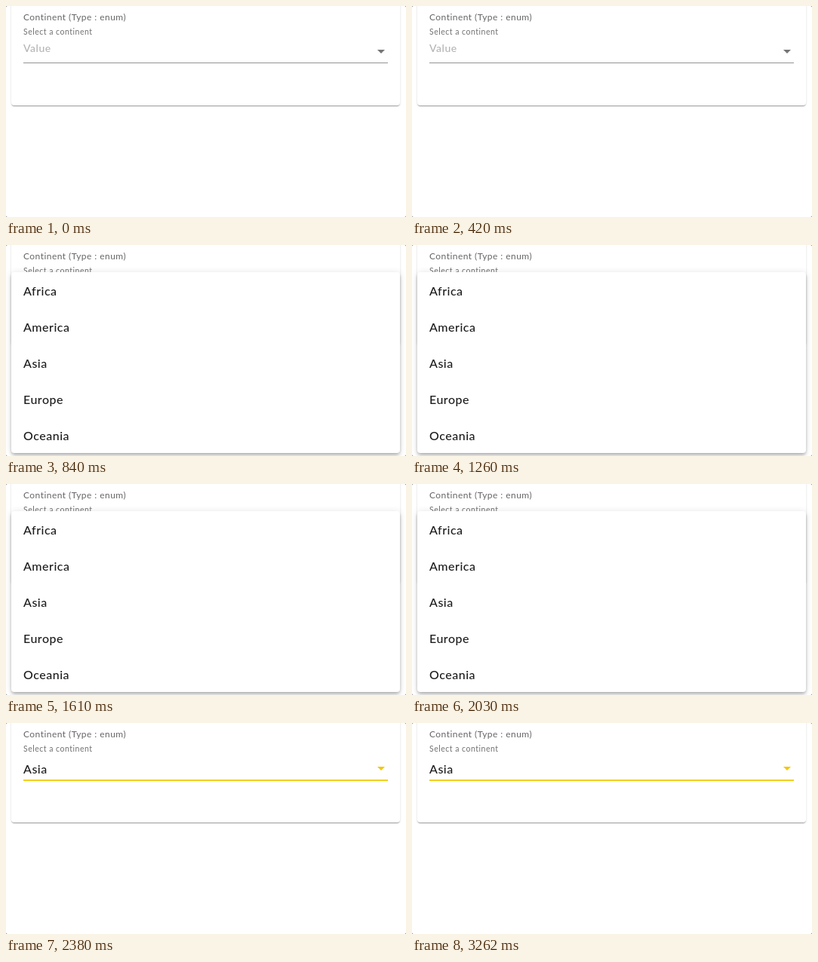
An HTML page for the animation above (3.85 s loop, 530x280 px).

```html
<!DOCTYPE html>
<html lang="en">
<head>
<meta charset="utf-8">
<title>Continent select</title>
<style>
  html, body { margin: 0; width: 100%; height: 100%; overflow: hidden; background: #777; }
  .stage { position: relative; width: 530px; height: 280px; overflow: hidden; border-radius: 2px; background: #fff; }
  .card, .menu { position: absolute; left: 7px; width: 515px; background: #fff; border-radius: 4px; }
  .card {
    top: -20px; height: 152px;
    box-shadow: 0 2px 1px -1px rgba(0,0,0,.2), 0 1px 1px rgba(0,0,0,.14), 0 1px 3px rgba(0,0,0,.12);
  }
  .menu {
    top: 36px; height: 240px;
    box-shadow: 0 2px 4px -1px rgba(0,0,0,.2), 0 4px 5px rgba(0,0,0,.14), 0 1px 10px rgba(0,0,0,.12);
  }
  svg { position: absolute; left: 0; top: 0; display: block; }
  text { font-family: Lato, "Open Sans", sans-serif; }
  .title { font-size: 12px; letter-spacing: .45px; fill: #666; }
  .hint { font-size: 10.5px; letter-spacing: .5px; fill: #707070; }
  .value { font-size: 14px; letter-spacing: .55px; fill: #b4b4b4; font-weight: 500; }
  .option { font-size: 16px; letter-spacing: .5px; fill: #1c1c1c; font-weight: 500; }

  .idle, .focus, .empty, .chosen, .menu, .pick { animation: 3850ms step-end infinite; }
  .idle { animation-name: idle; }
  .focus { animation-name: focus; }
  .empty { animation-name: empty; }
  .chosen { animation-name: chosen; }
  .menu { animation-name: menu; }
  .pick { animation-name: pick; }
  @keyframes idle { 0% { opacity: 1; } 18.1818%, 100% { opacity: 0; } }
  @keyframes focus { 0% { opacity: 0; } 18.1818%, 100% { opacity: 1; } }
  @keyframes empty { 0% { opacity: 1; } 61.8182%, 100% { opacity: 0; } }
  @keyframes chosen { 0% { opacity: 0; } 61.8182%, 100% { opacity: 1; } }
  @keyframes menu { 0% { opacity: 0; } 21.8182% { opacity: 1; } 61.8182%, 100% { opacity: 0; } }
  @keyframes pick { 0% { opacity: 0; } 60% { opacity: 1; } 61.8182%, 100% { opacity: 0; } }
</style>
</head>
<body>
<div class="stage">
  <div class="card"></div>
  <svg width="530" height="280">
    <text class="title" x="23" y="19">Continent (Type : enum)</text>
    <text class="hint" x="23" y="38">Select a continent</text>
    <text class="value empty" x="23" y="61">Value</text>
    <text class="option chosen" x="23" y="67">Asia</text>
    <g class="idle">
      <path d="M23 75h483v1H23z" fill="#949494"/>
      <path d="M492 58h10l-5 5z" fill="#757575"/>
    </g>
    <g class="focus">
      <path d="M23 75h483v2H23z" fill="#f2cf1d"/>
      <path d="M492 58h10l-5 5z" fill="#f5c60a"/>
    </g>
  </svg>
  <div class="menu">
    <svg width="515" height="240">
      <path class="pick" d="M0 96h515v48H0z" fill="#dcdcdc"/>
      <g class="option">
        <text x="16" y="31">Africa</text>
        <text x="16" y="79">America</text>
        <text x="16" y="127">Asia</text>
        <text x="16" y="175">Europe</text>
        <text x="16" y="223">Oceania</text>
      </g>
    </svg>
  </div>
</div>
</body>
</html>
```
